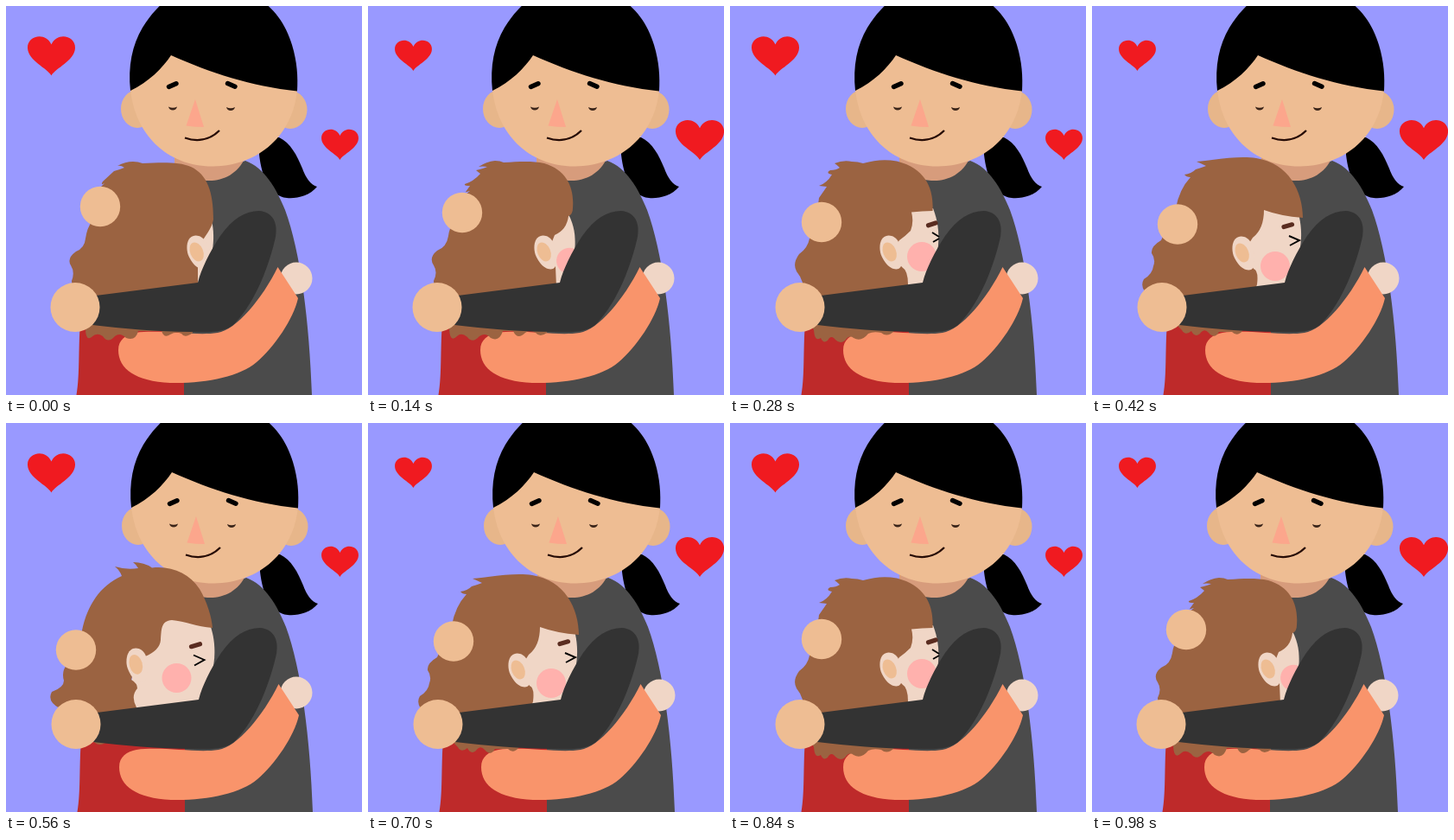
An HTML page that plays this animation: 412x450 px, repeating every 1.12 s.

```html
<!DOCTYPE html>
<html lang="en">
<head>
<meta charset="utf-8">
<title>Hug</title>
<style>
  html, body { margin: 0; width: 100%; height: 100%; overflow: hidden; background: #9999ff; }
  svg { display: block; width: 412px; height: 450px; }

  .sway, .palm, .pose { animation: 1120ms step-end infinite; }
  .sway { animation-name: sway; }
  .palm { animation-name: palm; }
  .beat { fill: #f01a20; animation: beat 280ms step-end infinite; }
  .off { animation-delay: -140ms; }

  @keyframes beat { 0% { visibility: visible; } 50%, 100% { visibility: hidden; } }
  @keyframes sway { 0%, 87.5% { transform: none; } 25% { transform: translate(1px, 0); } }
  @keyframes palm {
    0%, 87.5% { transform: none; }
    25%, 75% { transform: translate(2px, 0); }
    37.5%, 62.5% { transform: translate(1px, 0); }
    50% { transform: translate(0, -3px); }
  }

  /* The child turns out and back again: a b c d e d c b */
  .pose { visibility: hidden; }
  .a { animation-name: a; }
  .b { animation-name: b; }
  .c { animation-name: c; }
  .d { animation-name: d; }
  .e { animation-name: e; }
  @keyframes a { 0% { visibility: visible; } 12.5%, 100% { visibility: hidden; } }
  @keyframes b { 0%, 25% { visibility: hidden; } 12.5%, 87.5% { visibility: visible; } }
  @keyframes c { 0%, 37.5%, 87.5% { visibility: hidden; } 25%, 75% { visibility: visible; } }
  @keyframes d { 0%, 50%, 75% { visibility: hidden; } 37.5%, 62.5% { visibility: visible; } }
  @keyframes e { 0%, 62.5% { visibility: hidden; } 50% { visibility: visible; } }

  .tan { fill: #eebd93; }
  .lobe { fill: #e7b68a; }
  .pale { fill: #f0d6c6; }
  .hair { fill: #9b6341; }
  .cheek { fill: #ffb1ad; }
  .line { fill: none; stroke: #000; stroke-width: 1.9; }
  .brow { fill: none; stroke: #5a2c20; stroke-width: 5.2; stroke-linecap: round; }
</style>
</head>
<body>
<svg viewBox="0 0 412 450">
  <defs>
    <path id="heart" d="M0 0C-5 -9 -27 -17 -27.5 -32C-28 -46 -7 -51 0 -36C7 -51 28 -46 27.5 -32C27 -17 5 -9 0 0Z"/>
    <g id="ear">
      <path class="pale" d="M-12.5 -8C-11 -23 4 -22 9 -12C13 -4 13 8 12 16C9 22 0 20 -6 12C-11 5 -13 0 -12.5 -8Z"/>
      <ellipse class="tan" cx="-1" cy="-1" rx="7.5" ry="11.5" transform="rotate(-22)"/>
    </g>
    <circle id="hand" class="tan" r="23.2"/>
  </defs>

  <rect width="412" height="450" fill="#9999ff"/>
  <g class="beat">
    <use href="#heart" transform="translate(52.5 80.5)"/>
    <use href="#heart" transform="translate(386.5 178) scale(.78)"/>
  </g>
  <g class="beat off">
    <use href="#heart" transform="translate(52.5 75) scale(.78)"/>
    <use href="#heart" transform="translate(384 178) scale(1.02)"/>
  </g>

  <!-- mother -->
  <g class="sway">
    <path d="M293 172C294 155 302 152 316 152C329 158 337 173 343 188C347 199 353 207 360 209C351 220 336 223 325 222C305 220 296 198 293 172Z"/>
    <path fill="#4b4b4b" d="M277 179C299 187 313 211 323 236C341 285 351 365 354 450H190V200H225Z"/>
    <path fill="#d79c7c" d="M195 175H277C268 195 250 203 232 202C215 201 203 192 195 183Z"/>
    <ellipse class="lobe" cx="152" cy="119" rx="19" ry="22"/>
    <ellipse class="lobe" cx="329" cy="120" rx="19.5" ry="22"/>
    <path class="tan" d="M144 97C149 146 184 185.500 239 185.500C293 185 332 149 337 97L192 50Z"/>
    <path d="M144 98C141 70 146 45 158 25C168 9 178 -2 190 -9H290C309 0 324 21 331 45C337 65 338 82 337 98.500C284 93 236 77 191 57C181 72 165 88 144 98Z"/>
    <path class="line" style="stroke-width:5.400;stroke-linecap:round" d="M188.500 93.500L197 89.700M256.500 89.500L265 93.200"/>
    <path fill="#3a2419" d="M188 116.500Q193 119 198 116.500Q197 120.500 193 120.500T188 116.500ZM255 117Q260 119.500 265 117Q264 121 260 121T255 117Z"/>
    <path fill="#fca68c" d="M219 108L229 140Q218 140 208.500 138.500Z"/>
    <path class="line" style="stroke:#260c06;stroke-width:2.300" d="M207 152.500C220 157 235 156 247 144"/>
  </g>

  <!-- child's body and arm -->
  <path class="sway" fill="#be2a2a" d="M87 355C83 390 86 425 81.500 450H206V365Z"/>
  <circle class="pale palm" cx="336" cy="315" r="18.5"/>
  <path class="sway" fill="#f9946b" d="M314.500 302L338 338C333 362 310 395 290 412C270 429 230 437 190 436C150 434 130 420 130 398C130 386 139 380 150 378C180 374 220 382 245 378C266 375 297 338 314.500 302Z"/>

  <!-- child's head, five turns -->
  <g class="pose a">
    <path class="pale" d="M238 248C243 270 239 292 226 340H212V262Z"/>
    <path class="hair" d="M125 191Q132 189 137 187Q133 184 129 185Q138 180 147 180Q153 180 158 182C180 181 200 180 214 186C233 195 240 215 240 247C238 258 231 265 222 280L222 325L216 378Q207 385 203 379Q197 376 190 380Q183 385 180 376H153Q150 388 139 384Q132 377 126 382Q118 391 112 382Q105 377 99 383Q92 388 92 373L78 340L76 318Q80 308 75 300Q70 292 81 284Q91 280 92 269Q94 256 99 250L104 215L114 205Q109 208 112 203Z"/>
    <use href="#ear" x="222" y="285"/>
    <use href="#hand" x="109" y="232"/>
  </g>

  <g class="pose b">
    <path class="pale" d="M230 238C243 258 244 285 226 340H205V262Z"/>
    <path class="cheek" d="M239 281A15 15 0 0 0 226 308L239 292Z"/>
    <path class="hair" d="M125 190Q134 188 138 186Q132 185 128 186Q137 180 147 179Q153 179 157 181C175 180 190 179 204 182C230 190 239 210 237 234Q237 241 232 243Q230 259 216 265L208 285L217 301L218 325L207 378Q199 384 194 378Q187 374 182 378Q173 387 168 376H156Q152 389 142 384Q136 377 129 382Q121 391 115 383Q108 377 103 382Q95 390 94 374L78 340L76 318Q81 308 76 300Q70 291 80 283Q91 279 93 266Q94 257 99 251L108 222L118 214Q111 216 113 215L118 208Q111 208 112 206Q122 203 130 194Z"/>
    <use href="#ear" x="205" y="285"/>
    <use href="#hand" x="109" y="239"/>
  </g>

  <g class="pose c">
    <path class="pale" d="M208 234H235C245 260 245 290 222 340H200L186 285Z"/>
    <circle class="cheek" cx="222" cy="290" r="17"/>
    <path class="brow" d="M229.500 253.800L238 251"/>
    <path class="line" d="M234 262L242 267M242 269L235 273"/>
    <path class="hair" d="M103 208Q112 205 118 195Q110 193 116 190Q123 190 127 187Q124 184 121 182Q131 178 141 180Q148 180 154 182C168 178 180 177 193 179.500C227 188 236 212 234.500 237Q222 237 210 238.500Q213 250 209 260Q202 267 196 271L186 285L199 302Q206 306 206 322L190 376Q182 384 175 378Q166 376 160 379Q152 389 143 384Q138 380 133 387Q127 392 120 384Q116 381 113 387Q108 391 105 384Q98 389 97 375L80 340L84 320Q82 313 77 307Q72 298 80 287Q90 280 92 269Q94 256 100 244L103 222L112 209Z"/>
    <use href="#ear" x="186" y="285"/>
    <use href="#hand" x="106" y="250"/>
  </g>

  <g class="pose d">
    <path class="pale" d="M196 232L239 240C245 265 244 290 220 340H186L174 285Z"/>
    <circle class="cheek" cx="212" cy="301" r="17"/>
    <path class="brow" d="M222 255.500L231.500 252.800"/>
    <path class="line" d="M228 266L240 271L229 277"/>
    <path class="hair" d="M107 195Q115 194 120 189Q127 187 132 185Q126 182 121 180Q132 179 139 178C160 175 178 174 190 176C228 182 244 215 244 245Q218 243 199 236Q199 258 186 268L175 285L187 304Q193 306 191 322L174 376Q168 383 162 377H147Q142 386 135 378Q130 372 125 379Q119 384 115 376Q108 382 104 375L68 338Q54 326 60 316Q70 310 71 301Q74 293 69 286Q68 278 80 271L97 234Q101 212 114 198Q109 198 107 195Z"/>
    <use href="#ear" x="175" y="286"/>
    <use href="#hand" x="99" y="252.500"/>
  </g>

  <g class="pose e">
    <path class="pale" d="M178 226L235 230C244 254 247 285 220 340H140L148 278Z"/>
    <circle class="cheek" cx="197.500" cy="295" r="17"/>
    <path class="brow" d="M214.500 258.700L224.500 255.700"/>
    <path class="line" d="M217 268.500L229.500 274L218 280.500"/>
    <path class="hair" d="M126 166Q139 170 153 168Q151 164 147 161Q160 161 169 167.500C192 165 212 174 224 192C233 207 238 225 239 237C221 236 207 229 192 228C179 229 180 239 179 251Q178 263 161 270L150 278L145 297Q152 301 152 307Q144 316 151 329L148 345L115 370Q108 374 103 370L62 330Q47 322 53 311Q67 306 67 298Q64 288 70 280L88 240C94 211 109 188 134 177Q132 171 126 166Z"/>
    <use href="#ear" x="151.500" y="280" transform="rotate(6 151 280)"/>
    <use href="#hand" x="81" y="262.500"/>
  </g>

  <!-- mother's near arm -->
  <g class="sway">
    <path fill="#333" d="M100 335.500L222 320C226 304 236 284 248 266C262 246 277 237 293 237C308 238 315 250 312 267C305 299 289 342 265 367C254 378 238 377.500 215 377C175 377 135 373 100 369Z"/>
    <circle class="tan" cx="80" cy="348.500" r="28.500"/>
  </g>
</svg>
</body>
</html>
```
